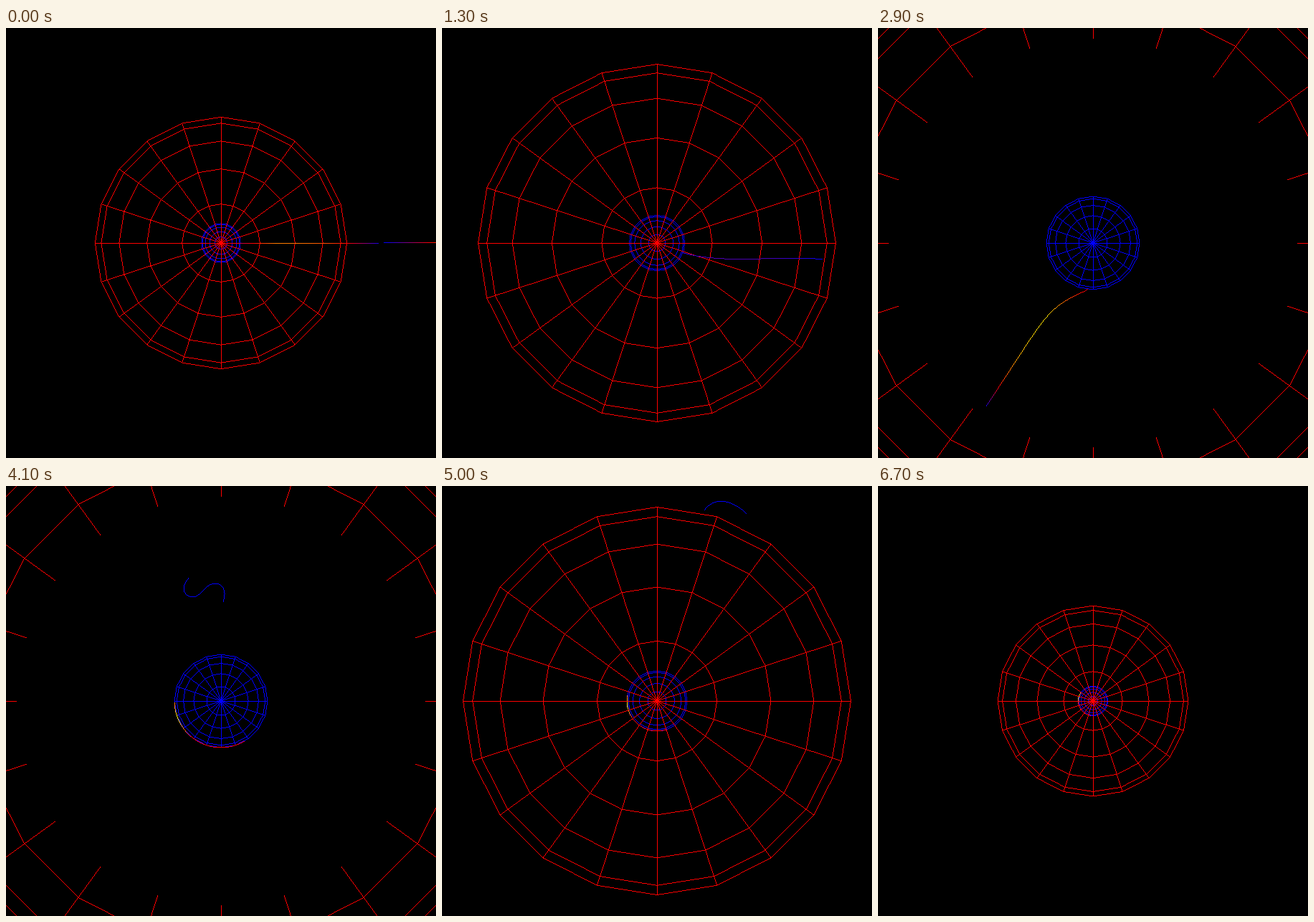
An HTML page with a canvas that plays this animation: 600x600 px, repeating every 7000 ms.

```html
<!DOCTYPE html>
<html>
<head>
<meta charset="utf-8">
<title>Falling cable</title>
<style>
html, body { margin: 0; width: 100%; height: 100%; overflow: hidden; background: #000; }
canvas { display: block; }
</style>
</head>
<body>
<canvas id="stage" width="600" height="600"></canvas>
<script>
const SIZE = 600, MID = 300, LOOP = 7000, STEP = 100, LAST = 67;
const PLANET = 0.155, SPIN = 1.45, TOUCH = 31, BREAK = 41;
const RED = [255, 0, 0], BLUE = [0, 0, 255];
const ctx = document.getElementById('stage').getContext('2d');
const image = ctx.createImageData(SIZE, SIZE);
const pixels = new Uint32Array(image.data.buffer);
const rad = deg => deg * Math.PI / 180;
const mix = (a, b, u) => a + (b - a) * u;
const clamp = (v, lo, hi) => Math.min(hi, Math.max(lo, v));

// Key points of the free cable
const CABLE = [
  { n: 0, ground: 0, reach: 1.252, bend: 2, peak: .75 },
  { n: 13, ground: 21, reach: .929, bend: 2, peak: .15 },
  { n: 23, ground: 99, reach: .557, bend: 1.15, peak: .3 },
  { n: 29, ground: 96, reach: .651, bend: 10, peak: .95 },
  { n: 41, ground: 178, reach: .36, bend: 2, peak: .5 }
];

function cableAt(n) {
  const i = CABLE.findIndex(key => key.n > n);
  const a = CABLE[i - 1], b = CABLE[i], u = (n - a.n) / (b.n - a.n);
  const state = {};
  for (const name in a) state[name] = mix(a[name], b[name], u);
  return state;
}

// Thin line that lights one pixel per step along its longer axis
function line(x0, y0, x1, y1, [r, g, b]) {
  const colour = (255 << 24 | b << 16 | g << 8 | r) >>> 0;
  const steep = Math.abs(y1 - y0) > Math.abs(x1 - x0);
  if (steep) [x0, y0, x1, y1] = [y0, x0, y1, x1];
  if (x0 > x1) [x0, y0, x1, y1] = [x1, y1, x0, y0];
  const slope = (y1 - y0) / (x1 - x0);
  for (let p = Math.max(0, Math.ceil(x0 - .5)); p + .5 < x1 && p < SIZE; p++) {
    const q = Math.floor(y0 + (p + .5 - x0) * slope + 1e-6);
    if (q >= 0 && q < SIZE) pixels[steep ? p * SIZE + q : q * SIZE + p] = colour;
  }
}

function polar(deg, radius) {
  return [MID + radius * Math.cos(rad(deg)), MID + radius * Math.sin(rad(deg))];
}

// Blue, red, orange, yellow
function heat(t) {
  t = clamp(t, 0, 1);
  return t < .5 ? [510 * t, 0, 255 - 510 * t].map(Math.round)
                : [255, Math.round(510 * t - 255), 0];
}

// Draws position(s) for s from 0 to 1, coloured by tension(s)
function curve(count, position, tension) {
  for (let i = 0; i < count; i++)
    line(...position(i / count), ...position((i + 1) / count), heat(tension(i / count)));
}

// Wire sphere seen from its pole; the parts nearer than the clip depth are cut off
function sphere(radius, colour) {
  for (let k = 0; k < 5; k++) {
    let inner = radius * Math.sin(rad(18 * k));
    const outer = radius * Math.sin(rad(18 * k + 18));
    const zIn = radius * Math.cos(rad(18 * k)), zOut = radius * Math.cos(rad(18 * k + 18));
    if (zOut > MID) continue;
    if (zIn > MID) inner = mix(inner, outer, (zIn - MID) / (zIn - zOut));
    for (let deg = 0; deg < 360; deg += 18) {
      line(...polar(deg, outer), ...polar(deg + 18, outer), colour);
      line(...polar(deg, inner), ...polar(deg, outer), colour);
    }
  }
}

// Half width of the view, in units of the outer sphere
function halfView(n) {
  return n < 40 ? Math.max(.716, 1.7075 - .03976 * n + .00007 * n * n)
                : clamp(1.109 * 1.104 ** (n - 50), .716, 2.256);
}

function wrapped(n, scale) {
  const start = SPIN * n;
  const end = n < BREAK ? cableAt(n).ground : 178 + SPIN * (n - BREAK);
  curve(24, s => polar(mix(start, end, s), PLANET * scale),
        s => .5 + .5 * Math.max(0, 1 - Math.abs(s - .82) / .25));
}

const swing = n => 265 / (1 + Math.exp((29.6 - n) / 4.4));

function cable(n, scale) {
  const { ground, reach, bend, peak } = cableAt(n);
  const tip = swing(n) - swing(0);
  curve(60, s => polar(mix(tip, ground, (1 - s) ** bend), mix(PLANET, reach, s) * scale),
        s => peak * (1 - s ** 4) * Math.min(1, .5 + 2 * s));
}

// Torn piece: an S that unrolls into an arch while it flies off
function piece(n, scale) {
  const d = n - BREAK, u = Math.min(1, d / 9), count = 40;
  let x = MID + (-.107 + .039 * d - .00194 * d * (d - 9)) * scale;
  let y = MID + (-.41 - .0637 * d - .00053 * d * (d - 9)) * scale;
  for (let i = 0; i < count; i++) {
    const s = (i + .5) / count;
    const heading = rad(mix(48, -48, u) + mix(-25, 105, u) * s +
                        mix(82, -7, u) * Math.cos(2 * Math.PI * s));
    const nx = x + Math.cos(heading) * .255 * scale / count;
    const ny = y + Math.sin(heading) * .255 * scale / count;
    line(x, y, nx, ny, BLUE);
    x = nx;
    y = ny;
  }
}

function upperCable(n, scale) {
  const start = MID + (1.292 + .05 * n) * scale;
  curve(40, s => [start + 200 * s, MID - .5], s => s * 1.6);
}

function draw(n) {
  const scale = MID / halfView(n);
  pixels.fill(0xff000000);
  sphere(PLANET * scale, BLUE);
  if (n >= TOUCH) wrapped(n, scale);
  sphere(scale, RED);
  if (n < BREAK) cable(n, scale);
  else if (n < LAST) piece(n, scale);
  if (n < 6) upperCable(n, scale);
  ctx.putImageData(image, 0, 0);
}

let shown = -1;
function tick() {
  const n = Math.min(LAST, Math.floor(performance.now() % LOOP / STEP));
  if (n !== shown) draw(shown = n);
  requestAnimationFrame(tick);
}
tick();
</script>
</body>
</html>
```
